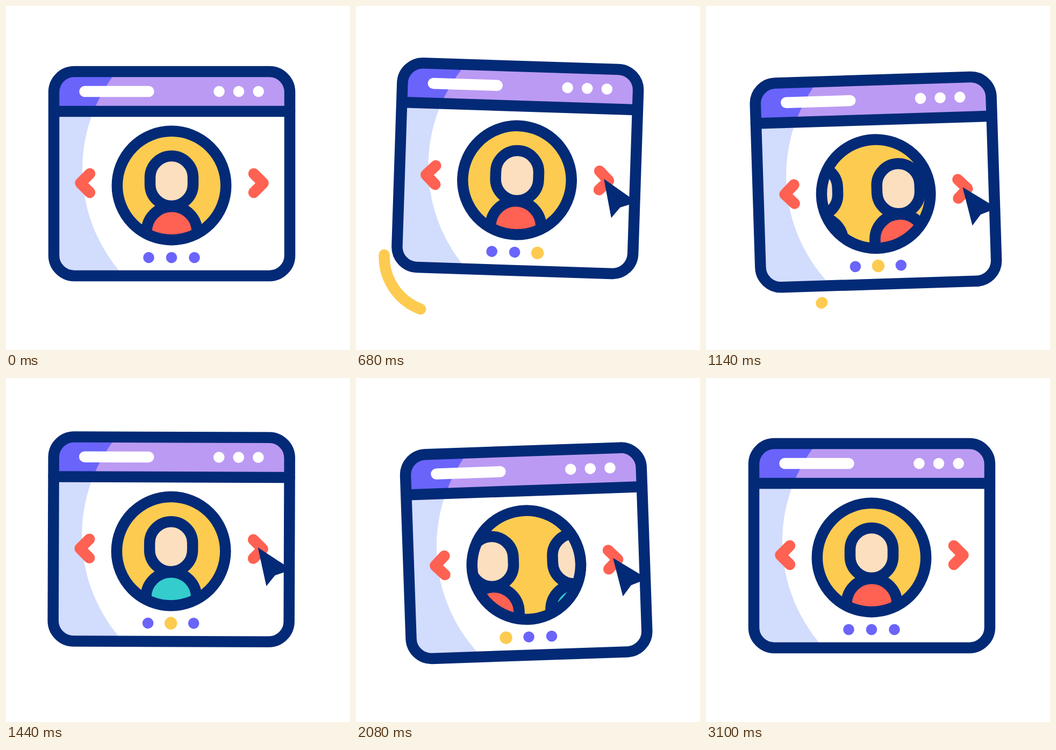
Recreate the animation shown at these times as an HTML page. Size 640 by 640 pixels, loop 3.2 s.

```html
<!DOCTYPE html>
<html lang="en">
<head>
<meta charset="utf-8">
<title>Profile carousel</title>
<style>
  html, body { margin: 0; width: 100%; height: 100%; overflow: hidden; background: #fff; }
  svg { display: block; width: 100%; height: 100%; }
  .line { fill: none; stroke-width: 20.5; stroke-linecap: round; stroke-linejoin: round; }
  .navy { stroke: #032a76; }
  .red { stroke: #ff6152; }
  .gold { stroke: #fdcb50; }
  .white { stroke: #fff; }
</style>
</head>
<body>
<svg viewBox="0 0 640 640">
  <defs>
    <clipPath id="inside"><rect x="89" y="122" width="439" height="380" rx="38"/></clipPath>
    <clipPath id="head"><rect x="89" y="122" width="439" height="74"/></clipPath>
    <clipPath id="body"><rect x="89" y="196" width="439" height="306"/></clipPath>
    <clipPath id="lens"><circle cx="308" cy="334" r="101"/></clipPath>
    <g id="person">
      <path class="line navy" d="M261.5 450V420a47 47 0 0 1 94 0V450Z"/>
      <rect class="line navy" x="268" y="279" width="80" height="93" rx="40" style="fill:#fcdfbf"/>
    </g>
  </defs>

  <g id="swing">
    <g clip-path="url(#inside)">
      <g clip-path="url(#head)">
        <rect x="89" y="122" width="439" height="74" fill="#6a64fa"/>
        <circle cx="435" cy="304" r="293" fill="#bb9af3"/>
      </g>
      <g clip-path="url(#body)">
        <rect x="89" y="196" width="439" height="306" fill="#d2dcfd"/>
        <circle cx="435" cy="304" r="293" fill="#fff"/>
      </g>
    </g>
    <path class="line navy" d="M89 196H528"/>
    <rect class="line navy" x="89" y="122" width="439" height="380" rx="38"/>
    <path class="line white" d="M146.5 159H265.5"/>
    <g fill="#fff">
      <circle cx="396.5" cy="159" r="10.3"/>
      <circle cx="433" cy="159" r="10.3"/>
      <circle cx="469.7" cy="159" r="10.3"/>
    </g>

    <circle cx="308" cy="334" r="101" fill="#fdcb50"/>
    <g clip-path="url(#lens)">
      <use id="personA" href="#person"/>
      <use id="personB" href="#person"/>
    </g>
    <circle class="line navy" cx="308" cy="334" r="101.2"/>

    <g id="dots">
      <circle cx="265.5" cy="468"/>
      <circle cx="308" cy="468"/>
      <circle cx="350.5" cy="468"/>
    </g>
    <path class="line red" d="M156 312L138.5 329.5L156 347"/>
    <path id="next" class="line red" d="M461 312L478.5 329.5L461 347"/>
    <path id="cursor" fill="#032a76" d="M0 0L63 41L32 52L16 72Z"/>
  </g>

  <path id="swooshA" class="line gold"/>
  <path id="swooshB" class="line gold"/>
</svg>
<script>
const LOOP = 3200;
const GAP = 153;
const RED = '#ff6152', TEAL = '#35cccd';
const PURPLE = [106, 100, 250], GOLD = [253, 203, 80];
const $ = id => document.getElementById(id);
const dots = [...$('dots').children];

const lerp = (a, b, k) => a + (b - a) * k;

// Eased progress of t between two moments
function ease(t, from, to) {
  const k = Math.min(1, Math.max(0, (t - from) / (to - from)));
  return k * k * (3 - 2 * k);
}

// Value of t along eased [time, value] keys
function track(t, keys) {
  let value = keys[0][1];
  for (let i = 1; i < keys.length; i++) {
    const [t0, v0] = keys[i - 1], [t1, v1] = keys[i];
    if (t >= t0) value = lerp(v0, v1, ease(t, t0, t1));
  }
  return value;
}

const TILT = [[300, 0], [751, 2], [1201, -2], [1651, 2], [2101, -2], [2545, 0]];
const BOB = [[200, 0], [600, -12.7], [1040, 20], [1485, -12.7], [1920, 20], [2360, 0]];
const PRESS = [[920, 1], [1020, .87], [1120, 1], [1760, 1], [1860, .87], [1960, 1]];

// Personal outfits get painted on a clone so each slide keeps its own colour
function dress(use, colour) {
  const g = $('person').cloneNode(true);
  g.removeAttribute('id');
  g.firstElementChild.style.fill = colour;
  use.replaceWith(g);
  return g;
}
const redOne = dress($('personA'), RED);
const tealOne = dress($('personB'), TEAL);

function slide(el, x) {
  el.setAttribute('transform', `translate(${x} 0)`);
}

function swoosh(el, cx, cy, r, start, end, tail, head) {
  const shown = head - tail > .004;
  el.style.display = shown ? '' : 'none';
  if (!shown) return;
  const at = k => {
    const a = lerp(start, end, k) * Math.PI / 180;
    return `${cx + r * Math.cos(a)} ${cy + r * Math.sin(a)}`;
  };
  el.setAttribute('d', `M${at(tail)}A${r} ${r} 0 0 ${end > start ? 1 : 0} ${at(head)}`);
}

function draw(t) {
  $('swing').setAttribute('transform',
    `translate(0 ${track(t, BOB)}) rotate(${track(t, TILT)} 308.5 75)`);

  const first = ease(t, 1010, 1390), second = ease(t, 1870, 2250);
  slide(redOne, second > 0 ? GAP * (second - 1) : GAP * first);
  slide(tealOne, GAP * (first - 1 + second));

  const lit = [
    ease(t, 1740, 1840) - ease(t, 2640, 2760),
    ease(t, 940, 1040) - ease(t, 1740, 1840),
    ease(t, 400, 560) - ease(t, 940, 1040)
  ];
  dots.forEach((dot, i) => {
    const rgb = PURPLE.map((c, j) => Math.round(lerp(c, GOLD[j], lit[i])));
    dot.setAttribute('fill', `rgb(${rgb})`);
    dot.setAttribute('r', lerp(10.3, 11.7, lit[i]));
  });

  $('next').setAttribute('transform',
    `translate(488 329.5) scale(${track(t, PRESS)}) translate(-488 -329.5)`);

  const away = 1 - ease(t, 200, 600) + ease(t, 2640, 2930);
  $('cursor').setAttribute('transform',
    `translate(${lerp(469.5, 645, away)} ${lerp(326.5, 203, away)}) rotate(${13 * away})`);

  swoosh($('swooshA'), 156.5, 466.5, 104, 182, 55, ease(t, 740, 1165), ease(t, 540, 800));
  swoosh($('swooshB'), 471, 448, 102.5, 0, 140, ease(t, 1560, 1960), ease(t, 1460, 1740));
}

const begun = performance.now();
function frame() {
  draw((performance.now() - begun) % LOOP);
  requestAnimationFrame(frame);
}
frame();
</script>
</body>
</html>
```
